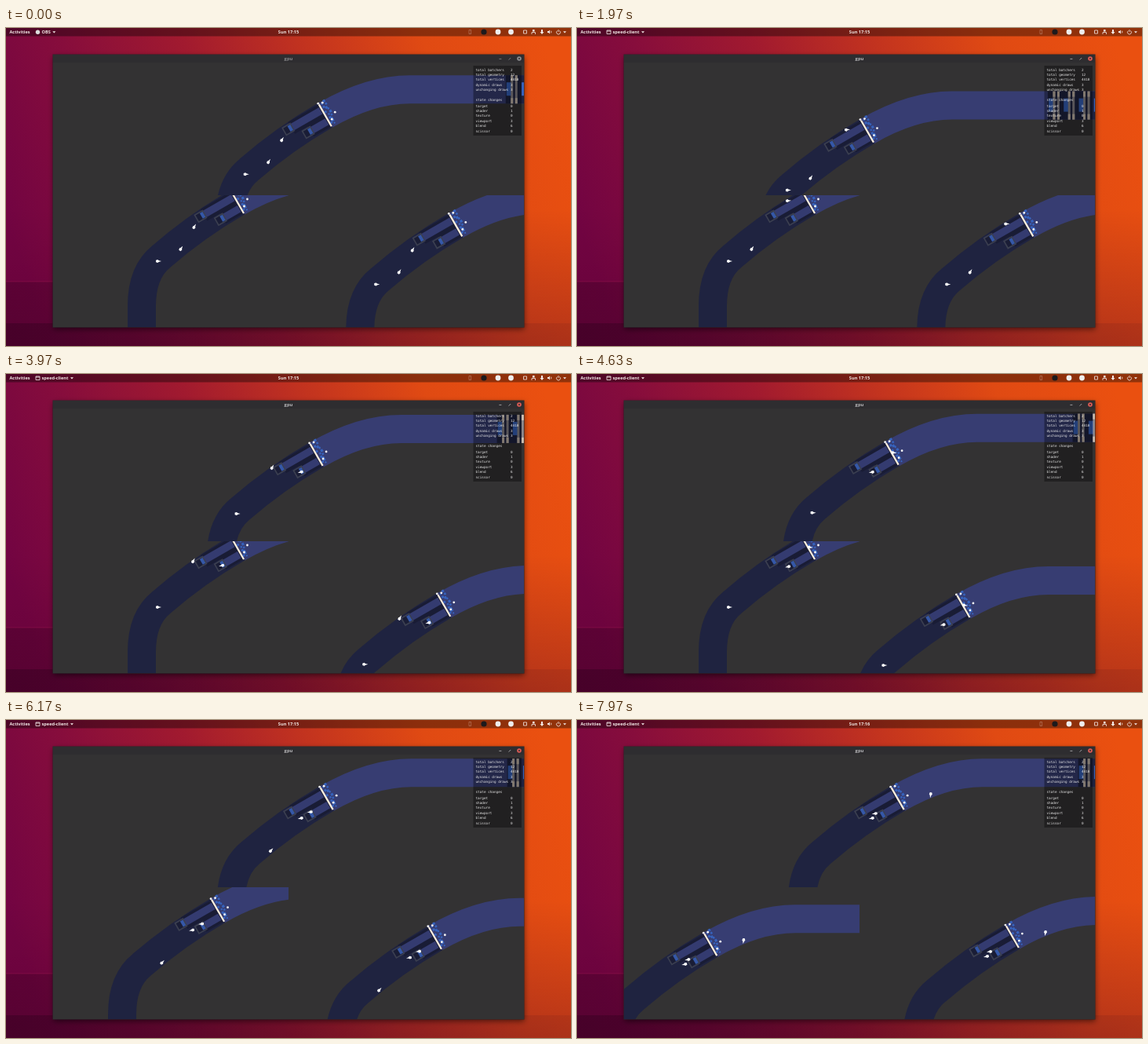
Animation of 720x405 px, one loop 8000 ms. Source, as an HTML page with a canvas:

```html
<!DOCTYPE html>
<html lang="en">
<head>
<meta charset="utf-8">
<title>gpu</title>
<style>
html, body { margin: 0; width: 720px; height: 405px; overflow: hidden; }
canvas { display: block; }
</style>
</head>
<body>
<canvas id="stage" width="720" height="405"></canvas>
<script>
const g = document.getElementById('stage').getContext('2d');
const LOOP = 8000, LEAD = 16, ROAD = 36;
const SANS = '"Open Sans", "Noto Sans", sans-serif';
const MONO = '"DejaVu Sans Mono", monospace';
const INK = '#f2e9e6', BLUE = '#3763bd';

// Keys are time, x, y, heading in degrees; the foot of the gate is the origin.
// Two ships leave home by the same climb along the edge and over the gate.
const climb = (start, ...home) => [
  [start, ...home], [start + 1000, -65, 3, -60], [start + 1400, -34, -16, -4], [start + 1930, 8, -14, 22]
];
const ships = [
  [[5470, -109, 61, 0], [6170, -79, 52, -47], [7100, -28, -14, -20], [7970, 34, -19, 98]],
  [...climb(2950, -80, 45, -57), [5370, -11, -2, 169], [6170, -29, 3, 172], [7970, -37, 5, 173]],
  [...climb(570, -63, 17, -59), [3030, -1, 0, 158], [3970, -28, 8, 167], [6170, -41, 11, 168]]
];

// Viewports: x, y, width, height, index of the followed ship.
const views = [[60, 44, 600, 169, 2], [60, 213, 300, 168, 0], [360, 213, 300, 168, 1]];

const lightRoad = new Path2D('M-8-14Q49-47 100-47H420');
const darkRoad = new Path2D('M-8-14Q-60 16-105 55Q-130 75-130 118V300');
const gateFloor = new Path2D('M0 0H26V15H45V32H0Z');
const shipShape = new Path2D('M4 0L.5-1L-.5-2L-3-1.3V1.3L-.5 2L.5 1Z');

function random(seed) {
  return () => (seed = seed * 16807 % 2147483647) / 2147483647;
}

function box(x, y, w, h, color) {
  g.fillStyle = color;
  g.fillRect(x, y, w, h);
}

function dot(x, y, r, color) {
  g.fillStyle = color;
  g.beginPath();
  g.arc(x, y, r, 0, 7);
  g.fill();
}

function fill(path, color) {
  g.fillStyle = color;
  g.fill(path);
}

function stroke(path, color, width) {
  g.strokeStyle = color;
  g.lineWidth = width;
  g.stroke(path);
}

const shape = (d, color) => fill(new Path2D(d), color);
const line = (d, color, width = .8) => stroke(new Path2D(d), color, width);

function gradient(x0, y0, x1, y1, ...colors) {
  const paint = g.createLinearGradient(x0, y0, x1, y1);
  colors.forEach((c, i) => paint.addColorStop(i / (colors.length - 1), c));
  return paint;
}

function text(s, x, y, font, color, align = 'left') {
  g.font = font;
  g.fillStyle = color;
  g.textAlign = align;
  g.textBaseline = 'middle';
  g.fillText(s, x, y);
}

// Monotone cubic through the keys; the ends are held.
function sample(keys, t, c) {
  const last = keys.length - 1;
  if (t <= keys[0][0]) return keys[0][c];
  if (t >= keys[last][0]) return keys[last][c];
  let i = 0;
  while (keys[i + 1][0] <= t) i++;
  const slope = k => k < 0 || k >= last ? 0 : (keys[k + 1][c] - keys[k][c]) / (keys[k + 1][0] - keys[k][0]);
  const tangent = k => {
    const a = slope(k - 1), b = slope(k);
    return a * b > 0 ? 2 * a * b / (a + b) : 0;
  };
  const h = keys[i + 1][0] - keys[i][0], s = (t - keys[i][0]) / h, r = 1 - s;
  return keys[i][c] * (1 + 2 * s) * r * r + keys[i + 1][c] * s * s * (3 - 2 * s)
    + h * (tangent(i) * s * r * r - tangent(i + 1) * s * s * r);
}

function pose(keys, t) {
  const [x, y, heading] = [1, 2, 3].map(c => sample(keys, t, c));
  return { x, y, a: heading * Math.PI / 180 };
}

function desktop() {
  box(0, 0, 720, 405, gradient(20, 300, 700, 60, '#720442', '#870d3c', '#a11a2f', '#c2331f', '#e04a13', '#ea5010'));
  box(0, 230, 720, 175, gradient(0, 230, 0, 405, 'rgba(80,0,40,0)', 'rgba(80,0,40,.3)'));
  box(0, 323, 720, 82, gradient(0, 0, 500, 0, 'rgba(40,0,25,.25)', 'rgba(40,0,25,0)'));
  box(0, 376, 720, 29, gradient(0, 0, 720, 0, 'rgba(40,0,25,.35)', 'rgba(40,0,25,.08)'));
  line('M0 323H60', 'rgba(255,60,110,.16)', 1);
}

function topBar(t, focused) {
  const bold = 'bold 5.6px ' + SANS;
  const arrow = x => shape(`M${x} 4.2h4l-2 2.4Z`, INK);
  const app = focused ? 'speed-client' : 'OBS';
  box(0, 0, 720, 10.5, 'rgba(0,0,0,.38)');
  text('Activities', 4.5, 5.2, bold, INK);
  if (focused) line('M38 3h5v4.5h-5ZM38 4h5', INK);
  else dot(40.5, 5.2, 2.7, '#ddd');
  text(app, 45.5, 5.2, bold, INK);
  arrow(48 + g.measureText(app).width);
  text(t < 6700 ? 'Sun 17:15' : 'Sun 17:16', 360, 5.2, bold, INK, 'center');

  line('M590 2.5h2.6v5h-2.6Z', 'rgba(255,255,255,.3)');
  dot(609, 5, 3.6, '#1d1a1c');
  dot(627, 5, 3.4, '#eee');
  dot(643.5, 5, 3.4, '#eee');
  line('M659.5 3h4v4h-4ZM670 8V5.5h4.5V8M694.3 3.6l.7 1.4l-.7 1.4M702.5 3.5a2.5 2.5 0 1 0 3 0M704 2v3', INK);
  shape('M671 2h2.6v2.4h-2.6ZM682 2h2v3h1.5l-2.5 3l-2.5-3h1.5ZM690 4h1.5l1.5-1.5v5l-1.5-1.5h-1.5Z', INK);
  arrow(710);
}

function appWindow(focused) {
  const ink = focused ? '#b9b9bb' : '#88888a';
  g.save();
  g.shadowColor = 'rgba(0,0,0,.55)';
  g.shadowBlur = 7;
  g.shadowOffsetY = 2;
  box(59.5, 33.5, 601, 348, '#29282a');
  g.restore();
  box(60, 34, 600, 10, '#2e2d30');
  box(60, 44, 600, 337, '#333233');
  text('gpu', 360, 39.3, 'bold 5.8px ' + SANS, ink, 'center');
  line('M628.4 39.4h3M640.6 40.6l2.6-2.6', ink);
  dot(654, 39, 2.8, focused ? '#dd5a55' : '#8b8b8d');
  line('M653 38l2 2M655 38l-2 2', '#333');
}

// In gate space u runs down the road and v across it.
function lane(v, length) {
  box(2, v - 4.7, length - 2, 9.4, '#343b70');
  box(length - 2, v - 6, 13, 12, '#3b3f50');
  box(length, v - 4.3, 9.3, 8.6, '#1a1d36');
  box(length - .5, v - 4, 4, 8, '#3558a8');
}

function gate() {
  g.save();
  g.transform(-.87, .5, -.5, -.87, 0, 0);
  fill(gateFloor, '#191c35');
  lane(24, 45);
  lane(8, 25);
  const rnd = random(11);
  for (let v = 2; v < 33; v += 2.2) {
    const size = 2 + 2 * rnd();
    box(-2 - 8 * rnd() - size / 2, v - size / 2, size, size, BLUE);
  }
  box(-1.1, 0, 2.2, 32, '#fff1df');
  g.restore();
  for (const [x, y] of [[-17, -29], [-11.5, -30], [4.5, -18], [.5, -9]]) dot(x, y, 1.4, '#f7f7f7');
}

function barriers() {
  box(222, -65, 80, ROAD, '#1e2240');
  for (let x = 223; x < 290; x += 19.3) {
    box(x, -56, 8, 17, BLUE);
    for (const bar of [x + 5.5, x + 11]) {
      box(bar, -65, 3, ROAD, '#8b878b');
      box(bar, -65, 3, 7, '#c9bcae');
      box(bar, -36, 3, 7, '#c9bcae');
    }
  }
}

function world(fleet, [x, y, w, h, followed]) {
  const s = fleet[followed];
  g.save();
  g.beginPath();
  g.rect(x, y, w, h);
  g.clip();
  g.translate(x + w / 2 - s.x - LEAD * Math.cos(s.a), y + h / 2 - s.y - LEAD * Math.sin(s.a));
  stroke(lightRoad, '#373d72', ROAD);
  stroke(darkRoad, '#1f2340', ROAD);
  barriers();
  gate();
  for (const p of fleet) {
    g.save();
    g.translate(p.x, p.y);
    g.rotate(p.a);
    fill(shipShape, '#fff');
    g.restore();
  }
  g.restore();
}

function stats(y, rows) {
  Object.entries(rows).forEach(([label, value], i) => {
    text(label, 598.5, y + 6.37 * i, '4.33px ' + MONO, '#e8e8e8');
    text(value, 643, y + 6.37 * i, '4.33px ' + MONO, '#e8e8e8');
  });
}

function hud() {
  box(595.5, 48, 61.5, 89, 'rgba(0,0,0,.36)');
  stats(53.5, {
    'total batchers': 2, 'total geometry': 12, 'total vertices': 4410, 'dynamic draws': 3, 'unchanging draws': 3
  });
  stats(91.8, { 'state changes': '' });
  stats(99.6, { target: 0, shader: 1, texture: 0, viewport: 3, blend: 6, scissor: 0 });
}

function draw(now) {
  const t = now % LOOP, focused = t >= 60;
  const fleet = ships.map(keys => pose(keys, t));
  desktop();
  topBar(t, focused);
  appWindow(focused);
  views.forEach(view => world(fleet, view));
  hud();
}

const start = performance.now();
function tick() {
  draw(performance.now() - start);
  requestAnimationFrame(tick);
}
tick();
</script>
</body>
</html>
```
